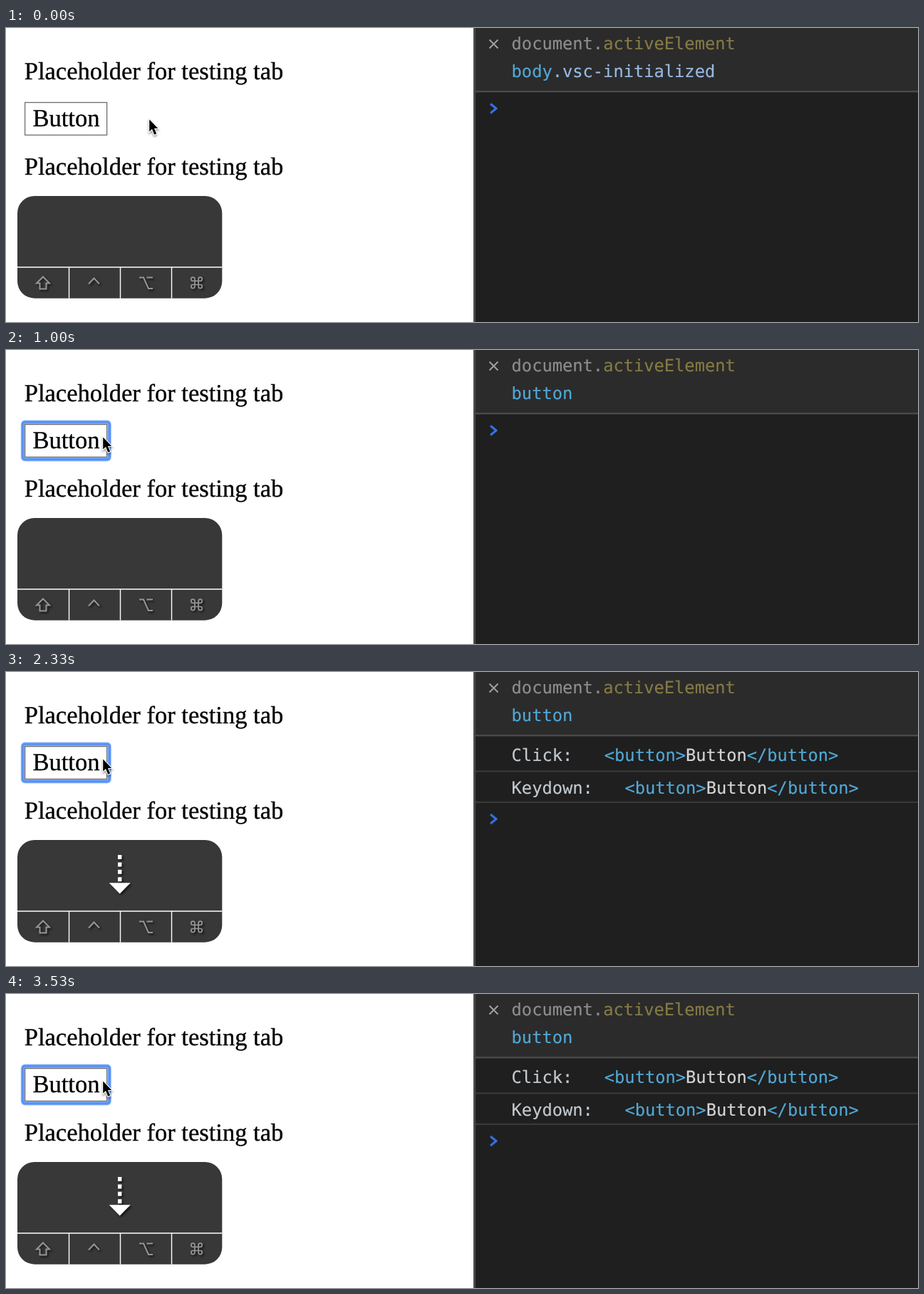
These frames come from a looping animation (1280 px wide and 413 px high, 3990 ms). An HTML page:

```html
<!DOCTYPE html>
<html lang="en">
<head>
<meta charset="utf-8">
<title>Focus and key events</title>
<style>
html, body { margin: 0; height: 100%; overflow: hidden; background: #fff; }
svg { display: block; width: 100vw; height: 100vh; }
text { white-space: pre; text-rendering: geometricPrecision; fill: currentColor; stroke: currentColor; }
tspan { fill: currentColor; stroke: currentColor; }
.page text { font: 34.56px "Liberation Serif", "Times New Roman", serif; color: #000; stroke-width: .35; }
.console text { font: 23.72px "DejaVu Sans Mono", monospace; color: #c3cad0; stroke-width: .2; }
.console .dim { color: #8e8e8e; }
.console .prop { color: #857a45; }
.console .tag { color: #52a8d6; }
.console .cls { color: #96b9e2; }
.console .plain { color: #d4d4d4; }
.line { fill: none; stroke-width: 2; }
.keys .line { stroke: #969696; }
.shadow { filter: drop-shadow(2px 2px 1.5px rgba(0, 0, 0, .65)); }
.soft { filter: drop-shadow(0 2px 1.5px rgba(0, 0, 0, .4)); }

.anim { animation: 3990ms step-end infinite; }
.cursor { animation-name: cursor; }
.ring { animation-name: ring; }
.before { animation-name: before; }
.after { animation-name: after; }
.click { animation-name: click; }
.arrow { animation-name: arrow; }
.keydown { animation-name: keydown; }
.divider { animation-name: divider; }
.prompt { animation-name: prompt; }

@keyframes cursor {
  0% { transform: translate(0, 0); }
  1.75% { transform: translate(-3px, 0); }
  3.25% { transform: translate(-10px, -1px); }
  5% { transform: translate(-22px, -2px); }
  6.75% { transform: translate(-36px, -4px); }
  8.25% { transform: translate(-48px, -5px); }
  10% { transform: translate(-57px, -6px); }
  11.75% { transform: translate(-62px, -6px); }
  13.25%, to { transform: translate(-65px, -6px); }
}
@keyframes ring { 0% { opacity: 0; } 21.75%, to { opacity: 1; } }
@keyframes before { 0% { opacity: 1; } 23.25%, to { opacity: 0; } }
@keyframes after { 0% { opacity: 0; } 23.25%, to { opacity: 1; } }
@keyframes click { 0% { opacity: 0; } 30%, to { opacity: 1; } }
@keyframes arrow { 0% { opacity: 0; } 56.8%, to { opacity: 1; } }
@keyframes keydown { 0% { opacity: 0; } 58.3%, to { opacity: 1; } }
@keyframes divider {
  0% { transform: translateY(0); }
  58.3%, to { transform: translateY(3px); }
}
@keyframes prompt {
  0% { transform: translateY(0); }
  30% { transform: translateY(46px); }
  58.3%, to { transform: translateY(93.5px); }
}
</style>
</head>
<body>
<svg viewBox="0 0 1280 413">
  <g class="page">
    <text x="25.7" y="72">Placeholder for testing tab</text>
    <g class="ring anim" fill="none">
      <rect x="23.5" y="101.4" width="121.6" height="52.2" rx="3" stroke="#a3c3fb" stroke-width="5.6"/>
      <rect x="23.5" y="101.4" width="121.6" height="52.2" rx="3" stroke="#5a92f3" stroke-width="3.6"/>
    </g>
    <rect x="26.6" y="104.6" width="115" height="45.8" fill="#fff" stroke="#6f6f6f" stroke-width="1.3"/>
    <text x="37.4" y="138">Button</text>
    <text x="25.7" y="206">Placeholder for testing tab</text>
  </g>

  <g class="keys">
    <rect x="16" y="236" width="287.3" height="143.7" rx="24" fill="#383838"/>
    <path d="M16 336H303.3M88.5 336V379.7M160.5 336V379.7M232.5 336V379.7" stroke="#fff" stroke-width="1.4"/>
    <g class="shadow">
      <path class="line" d="M52 349.5L61 358.5H56.5V366.5H47.5V358.5H43Z"/>
      <path class="line" d="M116 359.5L123.5 351.5L131 359.5"/>
      <path class="line" d="M187 350.5H193L200 366H206M197.5 350.5H206"/>
      <path class="line" transform="translate(257.2 347.6) scale(.86)" d="M18 3a3 3 0 0 0-3 3v12a3 3 0 1 0 3-3H6a3 3 0 1 0 3 3V6a3 3 0 1 0-3 3h12a3 3 0 0 0 0-6z"/>
    </g>
    <g class="arrow anim">
      <g class="shadow">
        <path d="M159.7 257V297" stroke="#fff" stroke-width="5.4" stroke-dasharray="6 4.4"/>
        <path d="M144.7 296.3H174.7L159.7 311.5Z" fill="#fff"/>
      </g>
    </g>
  </g>

  <g class="console">
    <rect x="656" width="624" height="413" fill="#1f1f1f"/>
    <rect x="656" width="624" height="88" fill="#2b2b2b"/>
    <rect x="656" y="88" width="624" height="2.4" fill="#494949"/>
    <rect x="656" width="3" height="413" fill="#484848"/>
    <path class="line" d="M678.5 16.5L690.5 28.5M690.5 16.5L678.5 28.5" stroke="#a0a0a0"/>
    <text x="709.6" y="30"><tspan class="dim">document.</tspan><tspan class="prop">activeElement</tspan></text>
    <text class="before anim" x="709.6" y="69"><tspan class="tag">body</tspan><tspan class="cls">.vsc-initialized</tspan></text>
    <text class="after anim" x="709.6" y="69"><tspan class="tag">button</tspan></text>

    <g class="click anim">
      <text x="709.6" y="125">Click:</text>
      <text x="839.8" y="125"><tspan class="tag">&lt;button&gt;</tspan><tspan class="plain">Button</tspan><tspan class="tag">&lt;/button&gt;</tspan></text>
      <rect class="divider anim" x="659" y="135.3" width="621" height="2.2" fill="#393939"/>
    </g>
    <g class="keydown anim">
      <text x="709.6" y="171">Keydown:</text>
      <text x="868.4" y="171"><tspan class="tag">&lt;button&gt;</tspan><tspan class="plain">Button</tspan><tspan class="tag">&lt;/button&gt;</tspan></text>
      <rect x="659" y="181.8" width="621" height="2.2" fill="#393939"/>
    </g>
    <path class="prompt anim" d="M680 106.5L688 113L680 119.5" fill="none" stroke="#3672e2" stroke-width="3"/>
  </g>

  <g class="cursor anim">
    <path class="soft" transform="translate(201.2 128.6)" d="M0 0V17L3.8 13.5L7 21.2L10 20L6.8 12.4H12Z" fill="#000" stroke="#fff" stroke-width="2.2" paint-order="stroke"/>
  </g>
</svg>
</body>
</html>
```
